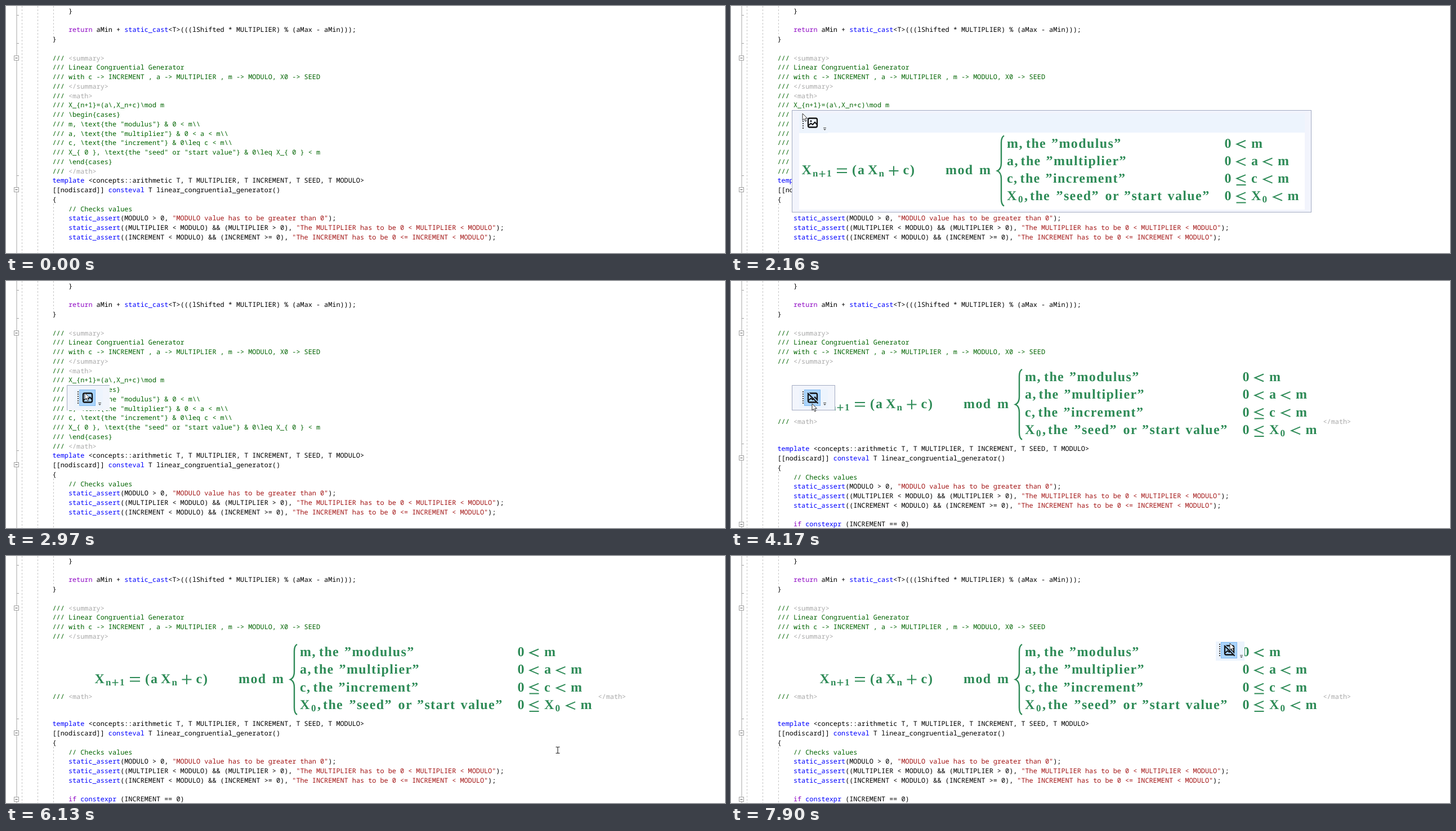
An HTML page that plays this animation: 1277 px wide and 439 px high, repeating every 8000 ms.

```html
<!DOCTYPE html>
<html lang="en">
<head>
<meta charset="utf-8">
<title>Formula preview in a code editor</title>
<style>
  html, body { margin: 0; width: 100%; height: 100%; overflow: hidden; background: #fff; }
  svg { display: block; }
  text { white-space: pre; text-rendering: geometricPrecision; }
  .code { font: 11.833px "Noto Sans Mono", "DejaVu Sans Mono", monospace; }
  .math text { font-family: "Liberation Serif", serif; font-weight: 700; letter-spacing: 0.058em; fill: #2e8b57; }
</style>
</head>
<body>
<script>
const LOOP = 8000;
const LEFT = 82.5, CHAR = 7.1, TOP = 0.9, PITCH = 16.75;
const COLORS = { g: '#006400', t: '#a9a9a9', k: '#0000ff', p: '#8f08c4', s: '#a31515', b: '#000' };

function add(parent, tag, attrs = {}, text) {
  const el = document.createElementNS('http://www.w3.org/2000/svg', tag);
  for (const name in attrs) el.setAttribute(name, attrs[name]);
  if (text !== undefined) el.textContent = text;
  parent.append(el);
  return el;
}
const group = (parent, attrs) => add(parent, 'g', attrs);
const rect = (parent, x, y, width, height, fill, more) =>
  add(parent, 'rect', { x, y, width, height, fill, ...more });
const path = (parent, d, stroke, width = 1, more) =>
  add(parent, 'path', { d, stroke, 'stroke-width': width, fill: 'none', ...more });
const show = (el, on) => { el.style.display = on ? '' : 'none'; };

const svg = add(document.body, 'svg', { width: 1277, height: 439, viewBox: '0 0 1277 439' });

// Code lines: [row, column, text]; "~x" switches the colour.
const HEAD = [
  [0, 4, '~b}'],
  [2, 4, '~preturn~b aMin + ~kstatic_cast~b<T>(((lShifted * MULTIPLIER) % (aMax - aMin)));'],
  [3, 0, '~b}'],
  [5, 0, '~g/// ~t<summary>'],
  [6, 0, '~g/// Linear Congruential Generator'],
  [7, 0, '~g/// with c -> INCREMENT , a -> MULTIPLIER , m -> MODULO, X0 -> SEED'],
  [8, 0, '~g/// ~t</summary>']
];
const BLOCK = [
  [9, 0, '~g/// ~t<math>'],
  [10, 0, '~g/// X_{n+1}=(a\\,X_n+c)\\mod m'],
  [11, 0, '~g/// \\begin{cases}'],
  [12, 0, '~g/// m, \\text{the "modulus"} & 0 < m\\\\'],
  [13, 0, '~g/// a, \\text{the "multiplier"} & 0 < a < m\\\\'],
  [14, 0, '~g/// c, \\text{the "increment"} & 0\\leq c < m\\\\'],
  [15, 0, '~g/// X_{ 0 }, \\text{the "seed" or "start value"} & 0\\leq X_{ 0 } < m'],
  [16, 0, '~g/// \\end{cases}'],
  [17, 0, '~g/// ~t</math>']
];
const TAIL = [
  [18, 0, '~ktemplate~b <concepts::arithmetic T, T MULTIPLIER, T INCREMENT, T SEED, T MODULO>'],
  [19, 0, '~b[[nodiscard]] ~kconsteval~b T linear_congruential_generator()'],
  [20, 0, '~b{'],
  [21, 4, '~g// Checks values'],
  [22, 4, '~kstatic_assert~b(MODULO > 0, ~s"MODULO value has to be greater than 0"~b);'],
  [23, 4, '~kstatic_assert~b((MULTIPLIER < MODULO) && (MULTIPLIER > 0), ~s"The MULTIPLIER has to be 0 < MULTIPLIER < MODULO"~b);'],
  [24, 4, '~kstatic_assert~b((INCREMENT < MODULO) && (INCREMENT >= 0), ~s"The INCREMENT has to be 0 <= INCREMENT < MODULO"~b);'],
  [26, 4, '~pif ~kconstexpr~b (INCREMENT == 0)']
];

const colX = col => LEFT + col * CHAR;
const rowY = row => Math.round(TOP + row * PITCH);

function codeText(parent, x, y, source) {
  const el = add(parent, 'text', { x, y, class: 'code' });
  for (const part of source.split('~').slice(1))
    add(el, 'tspan', { fill: COLORS[part[0]] }, part.slice(1));
}
function codeLines(parent, lines) {
  for (const [row, col, source] of lines) codeText(parent, colX(col), rowY(row) + 12, source);
}

// Outline around the formula block, following the line ends.
function outline() {
  const edge = y => y + 0.5;
  let d = `M${colX(10)} ${edge(rowY(9))}`;
  for (const [row, , source] of BLOCK) {
    const chars = source.replace(/~./g, '').length;
    const x = row === 17 ? colX(4) : colX(chars + 1);
    d += `H${Math.floor(x) + 0.5}V${edge(rowY(row + 1))}`;
  }
  return d + `H25.5V${edge(rowY(10))}H${colX(10)}Z`;
}
const selection = path(svg, outline(), '#f08080', 1.2, { fill: '#f1f0fb' });

// Gutter, fold boxes and indent guides
const guide = (parent, x, y1, y2) =>
  path(parent, `M${x} ${y1}V${y2}`, '#c4c4c4', 1, { 'stroke-dasharray': '3 3' });
function fold(parent, y) {
  rect(parent, 14.5, y - 4, 8, 8, '#fff', { stroke: '#a0a0a0' });
  path(parent, `M16.5 ${y}h4`, '#555');
}
const tick = (parent, y) => path(parent, `M19 ${y}h4`, '#a5a5a5');

path(svg, 'M19 0V439', '#a5a5a5');
guide(svg, 28.5, 0, 439);
guide(svg, 56.5, 0, 439);
guide(svg, 84.5, 0, 50);
tick(svg, 16.5);
tick(svg, 66.5);
fold(svg, 92.5);
codeLines(svg, HEAD);

const block = group(svg);
codeLines(block, BLOCK);

const tail = group(svg);
guide(tail, 84.5, 351, 460);
tick(tail, 301.5);
fold(tail, 326.5);
fold(tail, 444.5);
codeLines(tail, TAIL);

const tags = group(svg);
codeText(tags, LEFT, 254, '~g/// ~t<math>');
codeText(tags, 1051.5, 254, '~t</math>');

// Large preview panel
const panel = group(svg);
rect(panel, 108.5, 185.5, 922, 181, '#f2f4fc', { stroke: '#a3abc2' });
rect(panel, 121, 191, 898, 34, '#edf4fd');
rect(panel, 121, 225, 898, 137, '#fff');

// Formula
const formula = group(svg, { class: 'math' });
const GREEN = '#2e8b57';
const word = (x, y, text, size = 24) => add(formula, 'text', { x, y, 'font-size': size }, text);
const sub = (x, y, text) => word(x, y + 4, text, 17);
const plus = (x, y, r, w) => path(formula, `M${x - r} ${y}h${2 * r}M${x} ${y - r}v${2 * r}`, GREEN, w);
function less(x, y, orEqual) {
  const mid = y - (orEqual ? 7.5 : 6);
  path(formula, `M${x + 16.5} ${mid - 6.5}L${x + 1} ${mid}L${x + 16.5} ${mid + 6.5}` +
    (orEqual ? `M${x} ${y + 4}h17` : ''), GREEN, 2);
}

word(125.5, 299, 'X');
sub(145, 299, 'n');
plus(162, 298.5, 5.5, 1.7);
sub(170, 299, '1');
path(formula, 'M188 289.5h18M188 296h18', GREEN, 2);
word(215, 299, '(');
word(225, 299, 'a');
word(243, 299, 'X');
sub(262.5, 299, 'n');
plus(289, 293, 8.5, 2);
word(305.5, 299, 'c');
word(318, 299, ')');
word(381, 299, 'mod');
word(441, 299, 'm');
path(formula, 'M485 230.5Q480 233 480 243V279Q480 290 473 293Q480 296 480 307V343Q480 353 485 355.5', GREEN, 2.4);

const ROWS = [
  ['m,', 524, [[569, '”modulus”']]],
  ['a,', 514.5, [[559.5, '”multiplier”']]],
  ['c,', 513.5, [[558.5, '”increment”']]],
  ['X', 531, [[577.5, '”seed”'], [664.5, 'or'], [698, '”start'], [775.5, 'value”']]]
];
ROWS.forEach(([name, theX, words], i) => {
  const y = 251.5 + i * 31.3;
  word(490, y, name);
  word(theX, y, 'the');
  for (const [x, text] of words) word(x, y, text);
  word(876.5, y, '0');
  less(897.5, y, i > 1);
  if (i === 0) { word(924, y, 'm'); return; }
  const last = i === 3;
  word(924, y, name[0]);
  less(last ? 962.5 : 945, y, false);
  word(last ? 988.5 : 971, y, 'm');
  if (last) {
    sub(510, y, '0');
    word(521, y, ',');
    sub(943.5, y, '0');
  }
});

// Small panel and toolbar
const box = group(svg);
rect(box, 108, 185, 76, 45, '#f2f5fc');
path(box, 'M184 185.5H108.5V230', '#a3abc2');
const boxEdge = path(box, 'M184.5 185V229.5H108', '#a3abc2');

const bar = group(svg);
rect(bar, 121, 192, 51, 34, '#edf4fd');
path(bar, 'M128 196V218', '#444', 2, { 'stroke-dasharray': '2 2' });
const glow = rect(bar, 130.5, 193.5, 28, 28, '#a9d3fb', { stroke: '#7fb9f0' });
rect(bar, 137, 199.5, 16, 16, 'none', { rx: 2.5, stroke: '#111', 'stroke-width': 2.3 });
path(bar, 'M138 212L142 208.5L145 211L149 206.5L153 211', '#111', 1.9);
add(bar, 'circle', { cx: 142, cy: 204.5, r: 1.5, fill: '#111' });
const slash = group(bar);
path(slash, 'M137 198L155 216', '#a9d3fb', 2);
path(slash, 'M136 199L154.5 217.5', '#111', 2);
path(bar, 'M164 216.5h5', '#555');
add(bar, 'path', { d: 'M164 218.5h5l-2.5 2.5Z', fill: '#555' });

// Pointers
const beam = path(svg, 'M-3.5 -5.5H-1Q0 -5.5 0 -4.5Q0 -5.5 1 -5.5H3.5M0 -5V5M-3.5 5.5H-1Q0 5.5 0 4.5Q0 5.5 1 5.5H3.5', '#222', 1.1);
const arrow = path(svg, 'M0 0V12L2.8 9.4L4.8 14L6.8 13.1L4.8 8.7H8.5Z', '#333', 1, { fill: '#fff' });

// Pointer moves: start, end, steps, from, to, sideways bend, eased
const MOVES = [
  [330, 1090, 12, [1192, 432], [112, 172], 0, true],
  [1160, 1360, 3, [110, 178], [110, 183], 0, false],
  [2090, 2510, 7, [124.5, 189.5], [140, 199], 0, false],
  [4170, 4930, 12, [144, 218], [984, 348.5], 62, true],
  [6130, 6190, 2, [980, 345], [968, 338], 0, false],
  [6450, 7210, 12, [963, 336], [713, 254], 0, true],
  [7340, 7900, 9, [717, 250], [886, 155], 0, true]
];

function pointer(t) {
  const move = MOVES.filter(m => t >= m[0]).pop();
  if (!move) return null;
  const [start, end, steps, from, to, bend, eased] = move;
  const step = Math.min(steps - 1, Math.floor((t - start) / (end - start) * (steps - 1) + 0.01));
  let p = step / (steps - 1);
  if (eased) p = p * p * (3 - 2 * p);
  return [
    from[0] + (to[0] - from[0]) * p,
    from[1] + (to[1] - from[1]) * p + bend * Math.sin(Math.PI * p)
  ];
}

function draw(t) {
  const between = (a, b) => t >= a && t < b;
  const inline = t >= 3040;
  const large = between(1490, 2905);
  const small = between(2905, 4375);
  const floating = t >= 7000;
  const [dx, dy] = floating ? [740, -40] : [0, 0];
  const at = pointer(t);

  show(selection, between(880, 2090));
  show(block, !inline);
  show(tags, inline);
  tail.setAttribute('transform', `translate(0 ${inline ? -12 : 0})`);
  show(panel, large);
  show(formula, large || inline);
  formula.setAttribute('transform', inline ? 'translate(32 -73.5)' : '');
  show(box, small);
  show(boxEdge, inline);
  show(bar, large || small || floating);
  bar.setAttribute('transform', `translate(${dx} ${dy})`);
  show(slash, inline);

  show(beam, false);
  show(arrow, false);
  show(glow, false);
  if (!at) return;
  const x = at[0] - dx, y = at[1] - dy;
  show(glow, x > 130 && x < 160 && y > 192 && y < 222);
  const overBar = floating && x > 121 && x < 172 && y > 192 && y < 226;
  const useArrow = between(2090, 4375) || overBar;
  const shape = useArrow ? arrow : beam;
  show(shape, true);
  shape.setAttribute('transform', `translate(${at[0]} ${at[1]})`);
}

const began = performance.now();
function tickFrame() {
  draw((performance.now() - began) % LOOP);
  requestAnimationFrame(tickFrame);
}
tickFrame();
</script>
</body>
</html>
```
